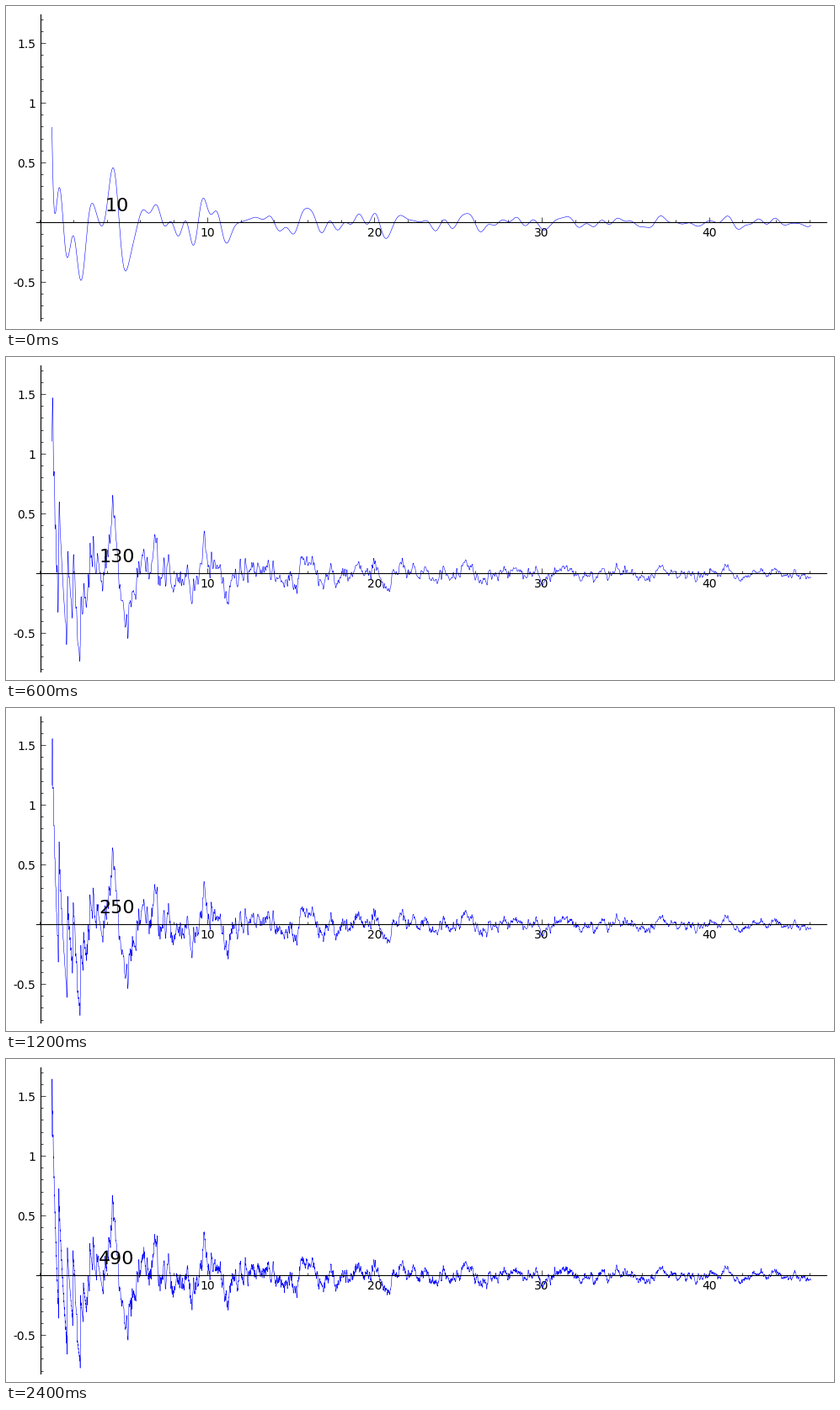
Write a matplotlib script that moves like this. It is 983 px wide and 384 px high and loops after 2600 ms.

```python
import numpy as np
import matplotlib.pyplot as plt
from matplotlib.animation import FuncAnimation
from matplotlib.ticker import MultipleLocator
from matplotlib.transforms import Affine2D

# Oscillating sum over zeros of the L-function of y^2 + y = x^3 - 7x + 6.
CONDUCTOR, RANK = 5077, 3
COUNTS = range(10, 491, 40)

WIDTH, HEIGHT, DPI = 983, 384, 100
LEFT, RIGHT, TOP, BOTTOM = 36, 973.5, 10, 374.5
ZERO_X, ZERO_Y = 40.25, 257.1
UNIT_X, UNIT_Y = 19.86, 142
HALF_PIXEL = 0.5  # ticks snap to whole pixels, the curve does not


def trace(p):
    """Coefficient a_p, from counting points modulo p."""
    if p == 2:
        return -2
    x = np.arange(p, dtype=np.int64)
    chi = -np.ones(p)
    chi[x * x % p] = 1
    chi[0] = 0
    return -chi[(4 * x**3 - 28 * x + 25) % p].sum()


def coefficients(limit):
    """Coefficients a_0 .. a_limit, built multiplicatively (a_0 is unused)."""
    a = np.ones(limit + 1)
    composite = np.zeros(limit + 1, dtype=bool)
    for p in range(2, limit + 1):
        if composite[p]:
            continue
        composite[p * p::p] = True
        ap = trace(p)
        weight = p if CONDUCTOR % p else 0
        previous, current, power = 1, ap, p
        while power <= limit:
            n = np.arange(power, limit + 1, power)
            a[n[n // power % p != 0]] *= current
            previous, current = current, ap * current - weight * previous
            power *= p
    return a


def find_zeros(count, height=232, tilt=0.08, step=0.01, size=2**17):
    """Positive ordinates of zeros, by a Mellin transform along a tilted ray."""
    scale = 2 * np.pi / np.sqrt(CONDUCTOR)
    limit = int(32 / (scale * np.sin(tilt)))
    a = coefficients(limit)
    n = np.arange(limit + 1)
    v = np.arange(0, np.log(limit), step)
    ray = np.exp(v + 1j * (np.pi / 2 - tilt))
    values = np.empty(len(v), dtype=complex)
    for k, w in enumerate(ray):
        terms = slice(1, int(limit / abs(w)) + 1)
        values[k] = w * np.sum(a[terms] * np.exp(-scale * w * n[terms]))
    values[0] /= 2

    t = 2 * np.pi * np.arange(size) / (size * step)
    z = np.fft.ifft(values, size).imag
    keep = (t > 0.5) & (t < height)
    t, z = t[keep], z[keep]
    i = np.flatnonzero(z[:-1] * z[1:] < 0)
    zeros = t[i] + (t[1] - t[0]) * z[i] / (z[i] - z[i + 1])
    return zeros[:count]


def partial_sums(u, zeros):
    """One curve per count; the central zeros count but add nothing."""
    curves, total, done = [], np.zeros_like(u), 0
    for count in COUNTS:
        for g in zeros[done:count - RANK]:
            total = total + 2 * np.sin(g * u) / g
        done = count - RANK
        curves.append(total / u)
    return curves


u = np.linspace(np.log(2), 20 * np.log(10), 10000)
curves = partial_sums(u, find_zeros(COUNTS[-1] - RANK))

plt.rcParams["font.family"] = "DejaVu Sans"
fig = plt.figure(figsize=((WIDTH + 1e-9) / DPI, (HEIGHT + 1e-9) / DPI),
                 dpi=DPI, facecolor="white")
ax = fig.add_axes([LEFT / WIDTH, 1 - BOTTOM / HEIGHT,
                   (RIGHT - LEFT) / WIDTH, (BOTTOM - TOP) / HEIGHT])
ax.patch.set_visible(False)
ax.set_xlim((LEFT - ZERO_X) / UNIT_X, (RIGHT - ZERO_X) / UNIT_X)
ax.set_ylim((ZERO_Y - BOTTOM) / UNIT_Y, (ZERO_Y - TOP) / UNIT_Y)

ax.spines["left"].set_position(("data", HALF_PIXEL / UNIT_X))
ax.spines["bottom"].set_position(("data", 0))
for side in ("left", "bottom"):
    ax.spines[side].set_linewidth(0.8)
for side in ("right", "top"):
    ax.spines[side].set_visible(False)
ax.set_xticks([10, 20, 30, 40], ["10", "20", "30", "40"])
ax.set_yticks([-0.5, 0.5, 1, 1.5], ["-0.5", "0.5", "1", "1.5"])
ax.xaxis.set_minor_locator(MultipleLocator(2))
ax.yaxis.set_minor_locator(MultipleLocator(0.1))
ax.tick_params(which="major", direction="in", length=4, width=0.5,
               pad=4, labelsize=10)
ax.tick_params(which="minor", direction="in", length=2, width=0.5)

nudge = Affine2D().translate(HALF_PIXEL, -HALF_PIXEL)
line, = ax.plot([], [], color="blue", linewidth=0.4,
                transform=ax.transData + nudge)
label = ax.text(4.6, 0.095, "", fontsize=16, ha="center", va="baseline", zorder=3)


def update(frame):
    line.set_data(u, curves[frame])
    label.set_text(str(COUNTS[frame]))
    return line, label


animation = FuncAnimation(fig, update, frames=len(COUNTS), interval=200,
                          repeat=True, repeat_delay=0)
plt.show()
```
